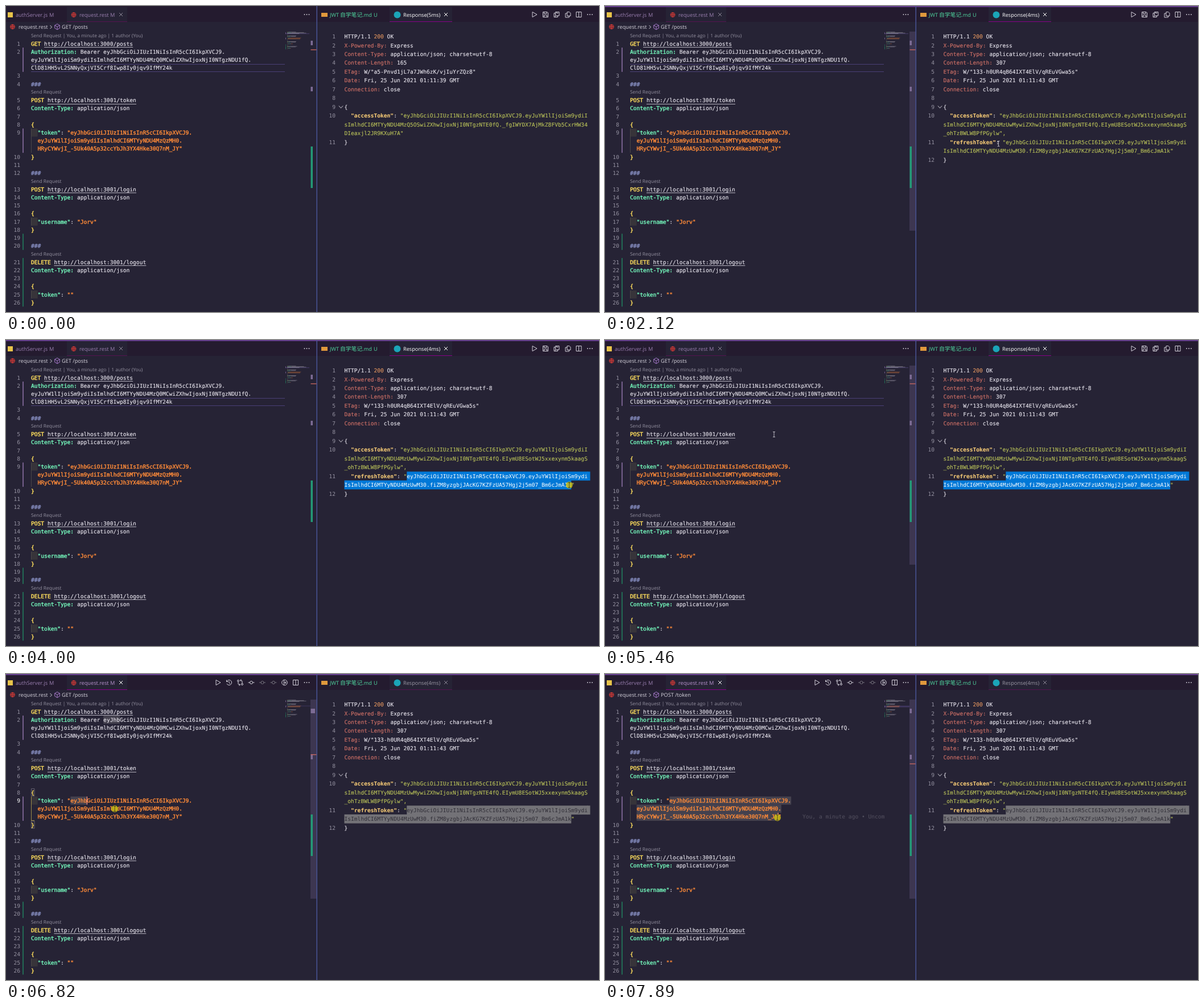
An HTML page with a canvas for the animation above (8000 ms loop, 1042 by 538 pixels).

```html
<!DOCTYPE html>
<html lang="en">
<head>
<meta charset="utf-8">
<title>REST client session</title>
<style>
html, body { margin: 0; width: 100%; height: 100%; overflow: hidden; background: #262335; }
canvas { display: block; width: 1042px; height: 538px; }
</style>
</head>
<body>
<canvas id="stage" width="1042" height="538"></canvas>
<script>
const g = document.getElementById('stage').getContext('2d', { alpha: false });
const LOOP = 8000, STEP = 1000 / 15, PHASE = 50;
const SENT = 1583, REPLY = 1720, FOCUS = 6600;
const MONO = '9.6px "DejaVu Sans Mono", monospace';
const BOLD = 'bold ' + MONO;
const UI = '9.2px "Open Sans", "Noto Sans", sans-serif';
const LENS = '8.4px "Open Sans", "Noto Sans", sans-serif';
const CJK = '9.8px "Noto Sans CJK SC", "Noto Sans CJK", sans-serif';
const CW = 5.779;
const LEFT = { x: 44, y: 66, h: 14.23 };
const RIGHT = { x: 594.5, y: 53.6, h: 15.46 };
const C = {
  bg: '#262335', bar: '#241b2f', white: '#e4e1ea', yellow: '#fede5d', green: '#72f1b8',
  orange: '#ff8b39', note: '#848bbd', dim: '#9491a0', purple: '#b893ce', icon: '#d3d0da',
  olive: '#b5bd58', gold: '#f0c674', red: '#cc6f66', number: '#de935f', file: '#50d8a0'
};

// Request file: '@' marks a lens row, '>' a wrapped row.
const HEAD = 'eyJhbGciOiJIUzI1NiIsInR5cCI6IkpXVCJ9.';
const CLAIM = 'eyJuYW1lIjoiSm9ydi';
const JSON_TYPE = 'Content-Type: application/json';
const HOST = 'http://localhost:300';
const rows = [
  `GET ${HOST}0/posts`,
  `Authorization: Bearer ${HEAD}`,
  `>${CLAIM}IsImlhdCI6MTYyNDU4MzQ0MCwiZXhwIjoxNjI0NTgzNDU1fQ.`,
  '>ClD81HH5vL2SNNyQxjVI5Crf8Iwp8Iy0jqv9IfMY24k',
  '', '###', '@', `POST ${HOST}1/token`, JSON_TYPE, '', '{',
  `  "token": "${HEAD}`,
  `>  ${CLAIM}IsImlhdCI6MTYyNDU4MzQzMH0.`,
  '>  HRyCYWvjI_-5Uk40A5p32ccYbJh3YX4Hke30Q7nM_JY"',
  '}', '', '###', '@', `POST ${HOST}1/login`, JSON_TYPE, '', '{',
  '  "username": "Jorv"', '}', '', '###', '@',
  `DELETE ${HOST}1/logout`, JSON_TYPE, '', '{', '  "token": ""', '}'
];
const gutter = [[1, 3, '#755f8c'], [11, 13, '#755f8c'], [24, 25, '#226a54'], [27, 32, '#226a54']];

const response = (length, tag, time, body) => [
  'HTTP/1.1 200 OK', 'X-Powered-By: Express', 'Content-Type: application/json; charset=utf-8',
  'Content-Length: ' + length, `ETag: W/"${tag}"`, `Date: Fri, 25 Jun 2021 01:11:${time} GMT`,
  'Connection: close', '', '{', ...body, '}'
];
const before = response(165, 'a5-Pnvd1jL7a7JWh6zK/vjIuYrZQz8', 39, [
  `  "accessToken": "${HEAD}${CLAIM}I`,
  '>sImlhdCI6MTYyNDU4MzQ5OSwiZXhwIjoxNjI0NTgzNTE0fQ._fgIWYDX7AjMkZ8FVb5CxrHW34',
  '>DIeaxjl2JR9KXuH7A"'
]);
const after = response(307, '133-h0UR4qB64IXT4ElV/qREuVGwa5s', 43, [
  `  "accessToken": "${HEAD}${CLAIM}I`,
  '>sImlhdCI6MTYyNDU4MzUwMywiZXhwIjoxNjI0NTgzNTE4fQ.EIymU8ESotWJ5xxexynm5kaagS',
  '>_ohTzBWLW8PfPGylw",',
  `  "refreshToken": "${HEAD}${CLAIM}`,
  '>IsImlhdCI6MTYyNDU4MzUwM30.fiZM8yzgbjJAcKG7KZFzUA57Hgj2j5m07_Bm6cJmA1k"'
]);

// Pointer path: time, x, y.
const path = [
  [250, 996, 533], [517, 546, 380], [650, 417, 350], [917, 228, 278], [1050, 113, 277],
  [1117, 109, 280], [1383, 70, 311], [1717, 70, 311], [1917, 400, 275], [2117, 692, 242],
  [2317, 720, 239], [2470, 719, 239], [2860, 707, 238], [3000, 704, 239], [3117, 775, 252],
  [3250, 880, 267], [3500, 968, 268], [3800, 986, 256], [4000, 990, 255], [5070, 990, 255],
  [5250, 640, 200], [5450, 297, 166], [5870, 157, 223], [6480, 113, 223], [6620, 113, 223],
  [6683, 142, 224], [6783, 191, 237], [7117, 272, 250], [7420, 304, 251], [7750, 304, 251],
  [7890, 302.5, 253]
];
function pointer(t) {
  const i = path.findIndex(k => k[0] > t);
  if (i < 0) return path[path.length - 1].slice(1);
  if (i === 0) return path[0].slice(1);
  const [t0, x0, y0] = path[i - 1], [t1, x1, y1] = path[i], p = (t - t0) / (t1 - t0);
  return [x0 + (x1 - x0) * p, y0 + (y1 - y0) * p];
}
const ramp = (t, from, span) => Math.min(1, Math.max(0, (t - from) / span));

function rect(x, y, w, h, color) {
  g.fillStyle = color;
  g.fillRect(x, y, w, h);
}
function text(s, x, y, color, font = UI, align = 'left', weight = 0) {
  g.font = font;
  g.textAlign = align;
  g.fillStyle = color;
  g.fillText(s, x, y);
  if (weight) {
    g.strokeStyle = color;
    g.lineWidth = weight;
    g.strokeText(s, x, y);
  }
}
function disc(x, y, r, color) {
  g.fillStyle = color;
  g.beginPath();
  g.arc(x, y, r, 0, 7);
  g.fill();
}
function stroke(d, x, y, color = C.icon, width = 1) {
  g.save();
  g.translate(x, y);
  g.strokeStyle = color;
  g.lineWidth = width;
  g.stroke(new Path2D(d));
  g.restore();
}
const ring = r => `M${r} 0A${r} ${r} 0 1 1 ${-r} 0A${r} ${r} 0 1 1 ${r} 0`;
const CROSS = 'M-3-3L3 3M3-3L-3 3';
const ICON = {
  play: 'M-3.5-4.5L4.5 0L-3.5 4.5Z',
  save: 'M-4.5-4.5H3L4.5-3V4.5H-4.5ZM-2.5-4.5V-1.5H2V-4.5M-2.5 4.5V1H2.5V4.5',
  saveAll: 'M-2-4.5H4.5V2H-2ZM0-4.5V-2.5H3M-2-2.5H-4.5V4.5H2V2M-2.5 4.5V2.5',
  copy: 'M-1-4.5H3L5-2.5V2.5H-1ZM-1-2H-4V5H2.5V2.5',
  split: 'M-4.5-4.5H4.5V4.5H-4.5ZM0-4.5V4.5',
  history: 'M-4-2A4.5 4.5 0 1 1-4 2M-4.5-4.5V-1.5H-1.5M0-2.5V.5L2 2',
  compare: 'M-3.5-1.5V2.5Q-3.5 4 0 4M3.5 1.5V-2.5Q3.5-4 0-4M-2 2L0 4L-2 5.5M2-5.5L0-4L2-2'
    + 'M-2-3A1.5 1.5 0 1 1-5-3A1.5 1.5 0 1 1-2-3M5 3A1.5 1.5 0 1 1 2 3A1.5 1.5 0 1 1 5 3',
  commit: ring(2.5) + 'M-5.5 0H-2.5M2.5 0H5.5',
  branch: ring(4.8) + 'M-1-4.5V4.5M-1-1L2 1.5M2-2V2'
};
const dots = x => [-4, 0, 4].forEach(d => disc(x + d, 15, 0.9, C.icon));
const toolbar = (names, x, faded = []) => names.forEach((n, i) =>
  stroke(ICON[n], x + i * 19.5, 15, faded.includes(i) ? '#77747f' : C.icon));
const globe = (x, y) =>
  stroke(ring(4) + 'M-4 0H4M0-4V4M0-4Q-4 0 0 4M0-4Q4 0 0 4', x, y, '#e03c36', 0.9);

// Split one row into coloured parts.
function tokens(s, wrapColor, reply) {
  let m;
  if (s[0] === '>') return [[s.slice(1), wrapColor]];
  if (s === '###') return [[s, C.note]];
  if (s === '{' || s === '}') return [[s, reply ? C.white : C.yellow]];
  if ((m = s.match(/^(HTTP\S+ )(\d+)(.*)/))) return [[m[1], C.white], [m[2], C.number], [m[3], C.white]];
  if ((m = s.match(/^(GET|POST|DELETE)( )(.*)/))) return [[m[1], C.yellow], [m[2], C.white], [m[3], C.white, 'link']];
  if ((m = s.match(/^(\s+"\w+")(: )(.*)/))) {
    return reply ? [[m[1], C.gold, 'bold'], [m[2], C.white], [m[3], C.olive]]
      : [[m[1], C.green], [m[2], C.white], [m[3], C.orange]];
  }
  if ((m = s.match(/^([\w-]+:)(.*)/))) return [[m[1], reply ? C.red : C.green], [m[2], C.white]];
  return [[s, C.white]];
}
const HEAVY = [C.yellow, C.green, C.orange, C.note];
function code(parts, x, y) {
  for (const [s, color, style] of parts) {
    const w = s.length * CW;
    text(s, x, y + 3.5, color, style === 'bold' ? BOLD : MONO, 'left', HEAVY.includes(color) ? 0.45 : 0.15);
    if (style === 'link') rect(x, Math.round(y + 6), w, 1, '#b5b2be');
    x += w;
  }
}
const rowText = s => s[0] === '>' ? s.slice(1) : s;
const wrapped = r => r < 4 ? C.white : C.orange;

// Row and column of a point, clamped to the text.
function locate(pane, lines, [x, y]) {
  const row = Math.max(0, Math.min(lines.length - 1, Math.round((y - pane.y) / pane.h)));
  const col = Math.round((x - pane.x) / CW);
  return [row, Math.max(0, Math.min(rowText(lines[row]).length, col))];
}

function drawTabs(t, leftActive) {
  const label = leftActive ? C.purple : '#9a7fb0';
  rect(0, 0, 1042, 28, C.bar);
  rect(107, 2, 106, 26, C.bg);
  rect(674, 2, 110, 26, C.bg);
  rect(107, 27, 106, 1, leftActive ? '#880088' : '#551250');
  rect(674, 27, 110, 1, leftActive ? '#551250' : '#880088');
  if (t >= SENT) rect(0, 0, 1042, 2, '#643d8c');
  rect(3, 11, 9, 9, '#e8c34a');
  text('authServer.js', 17, 18.7, '#9a7fb0');
  text('M', 76, 18.7, '#9a7fb0');
  globe(119, 15.5);
  text('request.rest', 129, 18.7, label);
  text('M', 183, 18.7, label);
  stroke(CROSS, 202, 15, leftActive ? '#fff' : '#8b8795');
  rect(554, 12, 11, 7, '#e0983c');
  text('JWT', 569, 18.7, C.file);
  text('自学笔记', 587, 18.9, C.file, CJK);
  text('.md', 626.3, 18.7, C.file);
  text('U', 646, 18.7, C.file);
  disc(687.5, 15.5, 6, '#1ba5b8');
  text(`Response(${t < REPLY ? 5 : 4}ms)`, 698, 18.7, leftActive ? '#9b98a5' : '#fff');
  stroke(CROSS, 773, 15, leftActive ? '#8b8795' : '#fff');
}

function drawChrome(t, leftActive) {
  drawTabs(t, leftActive);
  if (leftActive) toolbar(['play', 'history', 'compare', 'commit', 'commit', 'commit', 'branch', 'split'], 372.5, [4, 5]);
  else toolbar(['play', 'save', 'saveAll', 'copy', 'split'], 928.5);
  dots(528.5);
  dots(1026);
  globe(11.5, 36.5);
  text('request.rest', 22, 40.2, '#d2cfd9');
  stroke('M-1.5-3L1.5 0L-1.5 3', 79, 37);
  stroke('M0-5L4.3-2.5V2.5L0 5L-4.3 2.5V-2.5ZM-4.3-2.5L0 0L4.3-2.5M0 0V5', 90, 36.5, '#b180d7', 0.9);
  text(t >= 7050 ? 'POST /token' : 'GET /posts', 98, 40.2, '#dad7e0');
  rect(545.5, 0, 1.5, 538, '#495495');
}

function drawMinimap(selEnd) {
  const at = r => 45.5 + r * 0.93;
  if (selEnd) rect(491, at(11), 44, (selEnd[0] - 10) * 0.93, 'rgba(112,89,171,.35)');
  else rect(491, at(3), 42, 0.9, 'rgba(112,89,171,.5)');
  g.globalAlpha = 0.45;
  rows.forEach((s, r) => {
    let x = 494;
    if (s === '@') return;
    for (const [part, color] of tokens(s, wrapped(r))) {
      const pad = part.length - part.trimStart().length;
      rect(x + pad * 0.5, at(r), (part.length - pad) * 0.5, 0.7, color);
      x += part.length * 0.5;
    }
  });
  g.globalAlpha = 1;
  gutter.forEach(([a, b, color]) => rect(491, at(a), 1, (b - a + 1) * 0.93, color));
}

function drawRuler(t, selEnd) {
  const show = Math.max(ramp(t, 580, 100) * (1 - ramp(t, 2150, 700)), ramp(t, 5300, 100));
  if (show) rect(535, 45, 10.5, 350, `rgba(157,139,202,${0.19 * show})`);
  rect(535.5, 61, selEnd && selEnd[0] === 11 ? 7.5 : 3.5, 8, '#7d6c95');
  rect(535.5, 142, 3.5, 8, '#7d6c95');
  rect(535.5, 247, 3.5, 73, '#239a77');
  rect(535.5, 52 + 8.1 * (selEnd ? selEnd[0] : 3), 10, 1.3, '#cf6a62');
}

function drawRequest(t, selEnd) {
  const top = r => LEFT.y + (r - 0.5) * LEFT.h;
  const colX = c => LEFT.x + c * CW;
  gutter.forEach(([a, b, color]) => rect(29, top(a), 2, (b - a + 1) * LEFT.h, color));
  [[11, 3], [22, 1], [31, 1]].forEach(([r, n]) => {
    rect(44, top(r), 11.5, LEFT.h, '#37343a');
    rect(44, top(r), 1, n * LEFT.h, '#4a4748');
  });

  if (!selEnd) {
    rect(44, 102, 446, 1, '#4a4076');
    rect(44, 115, 446, 1, '#4a4076');
  } else {
    const [row, col] = selEnd, fill = '#45424f';
    for (let r = 11; r <= row; r++) {
      const from = r === 11 ? 12 : 2;
      const to = r === row ? col : rowText(rows[r]).length;
      rect(colX(from), top(r), Math.max(0, to - from) * CW, LEFT.h, fill);
    }
    if (row === 11) {
      rect(colX(22), top(1), Math.max(0, col - 12) * CW, LEFT.h, fill);
      g.strokeStyle = '#77737f';
      g.lineWidth = 0.8;
      [10, 14].forEach(r => g.strokeRect(44.5, top(r) + 0.5, 5.5, LEFT.h - 1.5));
      rect(44, top(11), 1, 3 * LEFT.h, '#9b8a48');
      rect(44, top(14) - 1, 6, 1, '#9b8a48');
    }
  }

  let line = 0;
  rows.forEach((s, r) => {
    const y = LEFT.y + r * LEFT.h;
    if (s === '@') {
      const hot = r === 17 && t >= 1250 && t < 1780;
      text('Send Request', 44, y + 3, hot ? '#4e94ce' : C.dim, LENS);
      return;
    }
    if (s[0] !== '>') {
      line++;
      const current = r === 11 && selEnd && selEnd[0] === 11;
      text(line, 25, y + 3.5, current ? '#fff' : C.dim, MONO, 'right');
    }
    code(tokens(s, wrapped(r)), LEFT.x, y);
  });
  text('Send Request | You, a minute ago | 1 author (You)', 44, 55, C.dim, LENS);
  if (t >= 7400) text('You, a minute ago • Uncom', 347, LEFT.y + 13 * LEFT.h + 3.5, '#53505f', MONO);
  if (selEnd) rect(colX(selEnd[1]) - 0.5, top(selEnd[0]), 1.3, LEFT.h, '#f98a7e');
}

function drawSelection(lines, [row, col], inactive) {
  const back = inactive ? '#737277' : '#0078d7', ink = inactive ? '#302e37' : '#fff';
  for (let r = 12; r <= row; r++) {
    const s = rowText(lines[r]), from = r === 12 ? 19 : 0;
    const to = r === row ? col : s.length;
    if (to <= from) continue;
    const x = RIGHT.x + from * CW, y = RIGHT.y + r * RIGHT.h, y0 = y - RIGHT.h / 2;
    rect(x, y0, (to - from) * CW, RIGHT.h + 0.3, back);
    if (r < row) rect(1021, y0, 5.5, RIGHT.h + 0.3, back);
    text(s.slice(from, to), x, y + 3.5, ink, MONO);
  }
}

function drawResponse(t, inactive) {
  const lines = t < REPLY ? before : after;
  let line = 0;
  lines.forEach((s, r) => {
    const y = RIGHT.y + r * RIGHT.h;
    if (s[0] !== '>') text(++line, 579, y + 3.5, C.dim, MONO, 'right');
    code(tokens(s, C.olive, true), RIGHT.x, y);
  });
  stroke('M-3.5-2L0 2L3.5-2', 588.5, 177.5);
  if (t >= 3000) drawSelection(lines, t >= 3800 ? [13, 69] : locate(RIGHT, lines, pointer(t)), inactive);
}

function drawPointer(t) {
  if (t < 250) return;
  const [x, y] = pointer(t);
  const pressed = (t >= SENT && t < REPLY) || (t >= 3000 && t < 4800) || t >= FOCUS;
  if (pressed) disc(x, y, 6, 'rgba(205,190,20,.85)');
  const hand = t >= 1250 && t < 1780;
  if (hand || (x > 546 && y > 263)) {
    g.save();
    g.translate(x, y);
    g.fillStyle = '#fff';
    g.strokeStyle = '#222';
    g.lineWidth = 0.6;
    const shape = new Path2D(hand
      ? 'M-1 0Q0-1 1 0V4L5 5V8L4 10H-1L-4 6L-3 5L-1 6Z'
      : 'M0 0V9L2 7L3.5 10L5 9.4L3.6 6.5H6.3Z');
    g.fill(shape);
    g.stroke(shape);
    g.restore();
  } else {
    stroke('M-2-4.5H2M-2 4.5H2M0-4.5V4.5', x, y, pressed ? '#3c3a20' : '#c9c7cf', 0.9);
  }
}

function draw(now) {
  const t = now % LOOP;
  const q = Math.max(0, PHASE + Math.floor((t - PHASE) / STEP + 0.01) * STEP);
  const leftActive = q >= FOCUS;
  let selEnd = null;
  if (leftActive) {
    const [row, col] = locate(LEFT, rows, pointer(q - 100));
    selEnd = [Math.max(11, Math.min(13, row)), Math.min(row === 13 ? 45 : 99, col)];
  }
  rect(0, 0, 1042, 538, C.bg);
  drawChrome(q, leftActive);
  drawRequest(q, selEnd);
  drawMinimap(selEnd);
  drawRuler(q, selEnd);
  drawResponse(q, leftActive);
  drawPointer(q);
}

g.textRendering = 'geometricPrecision';
g.lineJoin = 'round';
let start;
function tick(now) {
  if (start === undefined) start = now;
  draw(now - start);
  requestAnimationFrame(tick);
}
requestAnimationFrame(tick);
</script>
</body>
</html>
```
